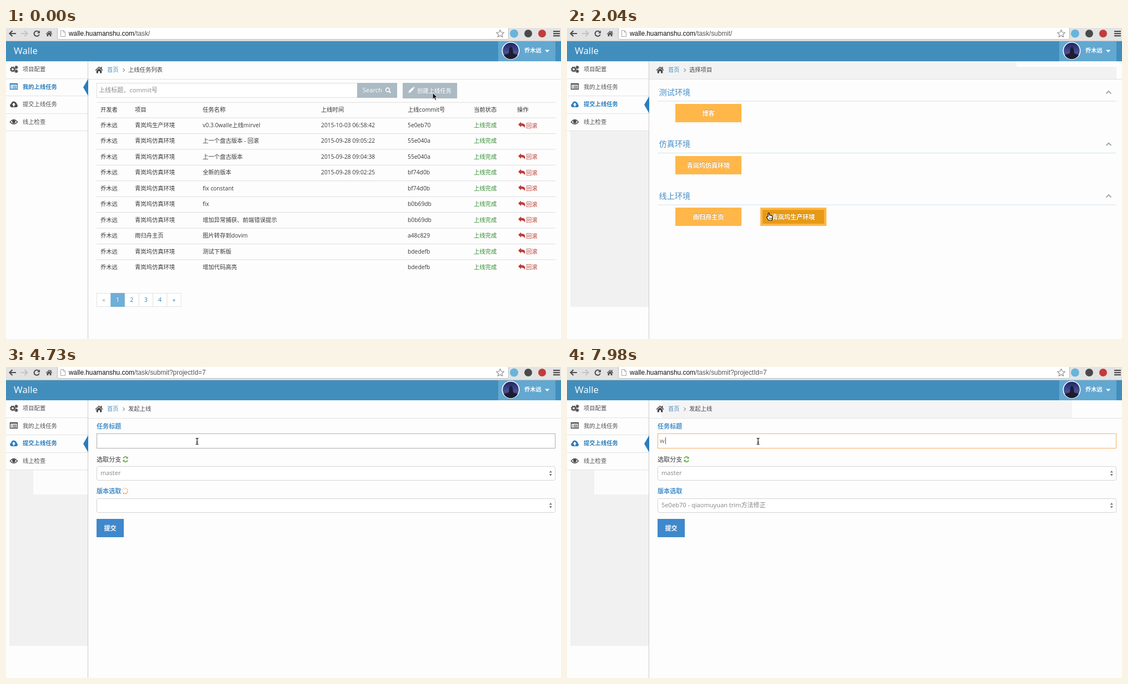
An HTML page for the animation above (8000 ms loop, 999 by 561 pixels).

```html
<!DOCTYPE html>
<html lang="zh">
<head>
<meta charset="utf-8">
<title>Walle</title>
<style>
html, body { margin: 0; width: 100%; height: 100%; overflow: hidden; background: #fdfdfd; }
svg { display: block; font-family: "Open Sans", "Noto Sans CJK SC", "Noto Sans CJK", sans-serif; }
.url { font-family: "Liberation Sans", Arial, sans-serif; }
text { white-space: pre; }
</style>
</head>
<body>
<svg id="stage" width="999" height="561" viewBox="0 0 999 561"></svg>
<script>
const USER = '乔木远', SIM = '青岚坞仿真环境', PROD = '青岚坞生产环境', HOME = '雨归舟主页';
const BLUE = '#2b7dbc', LINK = '#478fca', INK = '#393939', DARK = '#4a4a4a';
const BOLD = 'font-weight="600" ', MID = 'text-anchor="middle" ';

const text = (x, y, s, size = 10.3, fill = INK, more = '') =>
  `<text x="${x}" y="${y}" font-size="${size}" fill="${fill}" ${more}>${s}</text>`;
const rect = (x, y, w, h, fill, more = '') =>
  `<rect x="${x}" y="${y}" width="${w}" height="${h}" fill="${fill}" ${more}/>`;
const box = (x, y, w, h, stroke, more = '') =>
  rect(x + .4, y + .4, w - .8, h - .8, '#fff', `stroke="${stroke}" stroke-width=".8" ${more}`);
const circle = (x, y, r, fill, more = '') =>
  `<circle cx="${x}" cy="${y}" r="${r}" fill="${fill}" ${more}/>`;
const shape = (d, fill, more = '') => `<path d="${d}" fill="${fill}" ${more}/>`;
const line = (d, stroke, w = 1) => `<path d="${d}" fill="none" stroke="${stroke}" stroke-width="${w}"/>`;
const group = (id, body) => `<g id="${id}">${body}</g>`;

// Icons
const house = (x, y, s) => shape('M-7 .5L0-6L3-3.2V-5.5H5V-1.4L7 .5L6 1.5L0-4L-6 1.5Z M-4.8 1.5L0-2.8L4.8 1.5V6H1.5V2.5H-1.5V6H-4.8Z',
  DARK, `transform="translate(${x} ${y}) scale(${s})"`);
const gear = (x, y, r) => circle(x, y, r, 'none', `stroke="${DARK}" stroke-width="2"`) +
  circle(x, y, r + 1.3, 'none', `stroke="${DARK}" stroke-width="1.6" stroke-dasharray="${(r + 1.3) * Math.PI / 8}"`);
const listIcon = c => line('M7.5 100.5H20.5V110.5H7.5Z M7 101.5H21', c, 1.3) +
  line('M9.5 104.5H11M12 104.5H19M9.5 106.5H11M12 106.5H19M9.5 108.5H11M12 108.5H19', c, 1);
const cloudIcon = c => shape('M10 143a3.3 3.3 0 0 1-.6-6.4a4.7 4.7 0 0 1 8.6-2a3 3 0 0 1 1.5 3a2.9 2.9 0 0 1-.6 5.4Z', c) +
  shape('M14 134.8l3.3 3.6h-2v3h-2.6v-3h-2Z', '#fff');
const eye = line('M7.5 169.5Q14 161.5 20.5 169.5Q14 177 7.5 169.5Z', DARK, 1.4) + circle(14, 169, 2.9, DARK);
const reply = y => shape(`M922 ${y - 1.5}l5-4.7v2.6c6 0 8.5 2 7 8.5c-1-3-3-4-7-4v2.6Z`, '#b9403a');
const pencil = shape('M724.5 117l.8-3.4l6.4-6.4l2.6 2.6l-6.4 6.4Z M732.5 106.5l1-.8l2.5 2.4l-1 1Z', '#fff');
const arrows = y => shape(`M977.8 ${y - 1.3}h5l-2.5-3.7Z M977.8 ${y + 1.3}h5l-2.5 3.7Z`, '#777');
const refresh = line('M211 165a4 4 0 0 1 7-1.5M219 168a4 4 0 0 1-7 1.5', '#69aa46', 1.7) +
  shape('M219.5 161.5v4h-4Z M210.5 171.5v-4h4Z', '#69aa46');

function chromeBar() {
  return rect(0, 0, 999, 24, '#e3e3e3') + rect(0, 23, 999, 1, '#bcbcbc') +
    rect(92.5, -4, 812, 24.5, '#fff', 'rx="2" stroke="#bdbdbd"') +
    line('M18 10H6.5M11.5 5L6.5 10L11.5 15', '#4d4d4d', 2.2) +
    line('M27 10H38.5M33.5 5L38.5 10L33.5 15', '#c4c4c4', 2.2) +
    group('reload', line('M59 7.2a4.7 4.7 0 1 0 .8 4.3', '#4d4d4d', 2) + shape('M61 4.5v5h-5Z', '#4d4d4d')) +
    group('stop', line('M50.8 5.8L59.8 14.8M59.8 5.8L50.8 14.8', '#4d4d4d', 2.3)) +
    house(77.5, 10, .82) +
    line('M98.5 4.5H103.5L106.5 7.5V15.5H98.5Z M103.5 4.5V7.5H106.5', '#a5a5a5') +
    `<text class="url" x="113" y="14.3" font-size="11.85" fill="#111">walle.huamanshu.com<tspan id="path" fill="#555"></tspan></text>` +
    line('M889.5 3.5l2 4.3l4.7.5l-3.5 3.2l1 4.6l-4.2-2.4l-4.2 2.4l1-4.6l-3.5-3.2l4.7-.5Z', '#8a8a8a', 1.1) +
    circle(914.5, 10, 7.5, '#68b4dc') + circle(940, 10, 7, '#4a4a4a') + circle(965, 10, 7, '#c33b3b') +
    [5, 9, 13].map(y => rect(985, y, 12, 2.2, '#4d4d4d')).join('');
}

function header() {
  return rect(0, 24, 999, 36, '#418ebd') + rect(886, 24, 103, 36, '#62a8d1') +
    text(14, 47, 'Walle', 17, '#fff') +
    circle(908.5, 41, 15.2, 'url(#night)', 'stroke="#fff" stroke-width="1.6"') +
    shape('M896 49l9-3l1-9l3-4l3 5l1 8l8 3a14.5 14.5 0 0 1-25 0Z', '#1d1c30') +
    text(933, 44, USER, 10.3, '#fff', BOLD) + shape('M970 39.5h8.5l-4.25 4.5Z', '#fff');
}

function sidebar() {
  const label = (y, s, on) => text(30, y, s, 10.3, on ? BLUE : '#505050', `font-weight="${on ? 700 : 500}"`);
  const marker = y => shape(`M148 ${y}V${y + 31}L139 ${y + 15.5}Z`, BLUE);
  const second = on => listIcon(on ? BLUE : DARK) + label(109.5, '我的上线任务', on);
  const third = on => cloudIcon(on ? BLUE : DARK) + label(141, '提交上线任务', on);
  return group('sideGray', rect(6, 186, 141, 317, '#f1f1f1')) +
    group('sideClear', rect(49, 186, 98, 44, '#fcfcfc')) +
    rect(147, 60, 1, 501, '#ccc') +
    [91, 122, 154, 185].map(y => rect(0, y, 147, 1, '#e2e2e2')).join('') +
    gear(12, 74.5, 3) + gear(18.5, 71, 1.2) + gear(18.5, 78, 1.2) + label(77.8, '项目配置') +
    eye + label(172.8, '线上检查') +
    group('menuList', second(true) + third(false) + marker(91.5)) +
    group('menuSubmit', second(false) + third(true) + marker(123));
}

function crumbs() {
  return group('barLeft', rect(148, 60, 661, 32, '#f2f2f2')) +
    group('barRight', rect(809, 70, 180, 22, '#f2f2f2')) +
    group('barEdge', rect(148, 60, 15, 32, '#f2f2f2')) +
    group('barLate', rect(170, 60, 739, 32, '#f4f4f4')) +
    rect(148, 92, 851, 1, '#e2e2e2') + house(167.5, 75.5, 1) +
    text(182, 79.3, '首页', 10.3, '#4c8fbd') + line('M210.5 73l3 3l-3 3', '#999', 1.2) +
    text(220, 79.3, '', 10.3, '#444', 'id="crumb"');
}

function listPage() {
  const cols = [170, 232, 354, 567, 723, 842, 920];
  const rows = [
    [PROD, 'v0.3.0walle上线mirvel', '2015-10-03 06:58:42', '5e0eb70'],
    [SIM, '上一个盘古版本 - 回滚', '2015-09-28 09:05:22', '55e040a'],
    [SIM, '上一个盘古版本', '2015-09-28 09:04:38', '55e040a'],
    [SIM, '全新的版本', '2015-09-28 09:02:25', 'bf74d0b'],
    [SIM, 'fix constant', '', 'bf74d0b'],
    [SIM, 'fix', '', 'b0b69db'],
    [SIM, '增加异常捕获、前端错误提示', '', 'b0b69db'],
    [HOME, '图片转存到dovim', '', 'a48c829'],
    [SIM, '测试下新版', '', 'bdedefb'],
    [SIM, '增加代码高亮', '', 'bdedefb']];
  let s = box(163, 99, 470, 27, '#d5d5d5') + text(167, 116, '上线标题、commit号', 11.1, '#8a8a8a') +
    rect(632, 99, 72, 27, '#abbac3') + text(642, 115.8, 'Search', 11.1, '#fff') +
    circle(687, 111.5, 3.4, 'none', 'stroke="#fff" stroke-width="1.6"') + line('M689.5 114l3 3', '#fff', 2) +
    rect(714, 99, 98, 28, '#abbac3') + group('createHover', rect(717, 102, 92, 22, '#8b9aa3')) +
    pencil + text(740, 116.5, '创建上线任务', 10.3, '#fff') + rect(163, 133.8, 826, .8, '#d5d5d5');
  ['开发者', '项目', '任务名称', '上线时间', '上线commit号', '当前状态', '操作'].forEach((h, i) =>
    s += text(cols[i], 151, h, 10.3, '#333', 'font-weight="500"'));
  rows.forEach((row, i) => {
    const y = 179 + i * 28.44;
    s += rect(163, y - 17.4, 826, .8, '#d5d5d5');
    [USER, ...row].forEach((cell, j) => s += text(cols[j], y, cell));
    s += text(842, y, '上线完成', 10.3, '#2f8a2f');
    if (i != 1) s += reply(y - 3.5) + text(936, y + .5, '回滚', 10.3, '#b9403a');
  });
  ['«', 1, 2, 3, 4, '»'].forEach((p, i) => {
    const x = 163 + i * 25.3, on = i == 1;
    s += (on ? rect(x, 478, 26, 25, '#6faed9') : box(x, 478, 26, 25, '#ddd')) +
      text(x + 12.8, 493.5, p, 10.6, on ? '#fff' : i ? '#2283c5' : '#999', MID);
  });
  return s;
}

function pickPage() {
  const button = (x, y, s, hover = '') => rect(x, y, 119, 33, '#ffb74a') + hover +
    text(x + 59.5, y + 20.8, s, 11.1, '#fff', MID + BOLD + 'style="text-shadow:0 -1px 0 #0003"');
  const section = (y, s) => text(165.5, y + 5, s, 14.2, LINK) + rect(163, y + 16, 826, 1, '#d3e2ec') +
    line(`M970.5 ${y + 3}l4.5-4.5l4.5 4.5`, '#aaa', 2.2);
  return section(115.5, '测试环境') + button(195, 137, '博客') +
    section(209, '仿真环境') + button(195, 231, SIM) +
    section(302.5, '线上环境') + button(195, 324, HOME) +
    button(348, 324, PROD, group('pickHover', rect(352, 328, 111, 25, '#e79a14')));
}

function formPage() {
  let dots = '';
  for (let i = 0; i < 8; i++) {
    const a = i * Math.PI / 4;
    dots += circle(5 * Math.cos(a), 5 * Math.sin(a), .6 + i * .1, '#ff892a');
  }
  const select = y => box(163, y, 826, 25.8, '#c8c8c8', 'rx="3"') + arrows(y + 12.8);
  return text(163, 111, '任务标题', 11.1, LINK, BOLD) + box(163, 119.8, 826, 27, '#d0d0d0', 'id="field"') +
    text(167, 137, 'w', 11.1, '#696969', 'id="typed"') + rect(168, 127, 1, 12, '#555', 'id="caret"') +
    text(163, 170.5, '选取分支', 11.1) + refresh + select(179) + text(170, 195, 'master', 11.1, '#858585') +
    text(163, 228.3, '版本选取', 11.1, LINK, BOLD) + group('spinner', dots) + select(237) +
    text(170, 253.3, '5e0eb70 - qiaomuyuan trim方法修正', 11.1, '#858585', 'id="version"') +
    rect(163, 274, 49, 33, '#3f88cb') + text(187.5, 295, '提交', 11.1, '#fff', MID + BOLD);
}

function cursors() {
  return group('arrow', shape('M0 0V11.5L2.7 9L4.7 13.3L6.7 12.4L4.8 8.3H8.3Z', '#111', 'stroke="#fff" stroke-width=".8"')) +
    group('hand', shape('M-2.5 0V-5.5a1.2 1.2 0 0 1 2.3 0V-2.5l4 .8q1.6.4 1.6 2V3l-1 4H-1.5L-4.8 2.2q-.8-1.5.6-1.8Z', '#fff', 'stroke="#111" stroke-width="1.2"') +
      line('M0 2v3M2 2v3M3.9 2v3', '#111', .7)) +
    group('beam', line('M-2.5-5.5Q0-5.5 0-4V4Q0 5.5-2.5 5.5M2.5-5.5Q0-5.5 0-4M0 4Q0 5.5 2.5 5.5M-1.5 1.5H1.5', '#111', 1.2));
}

const el = id => document.getElementById(id);
el('stage').innerHTML = '<defs><linearGradient id="night" x2="0" y2="1"><stop stop-color="#1c2363"/><stop offset=".6" stop-color="#4a5297"/><stop offset="1" stop-color="#1b1b30"/></linearGradient></defs>' +
  rect(0, 0, 999, 561, '#fdfdfd') + crumbs() + sidebar() + header() + chromeBar() +
  group('list', listPage()) + group('pick', pickPage()) + group('form', formPage()) + cursors();

const STEP = 147.2;
const show = (id, on) => el(id).style.display = on ? '' : 'none';
const stepsSince = (t, start, max) => Math.max(0, Math.min(max, Math.floor((t - start) / STEP) + 1));
const ease = p => p * p * (3 - 2 * p);
const mix = (a, b, p) => a + (b - a) * p;

function draw(t) {
  // The address changes before the second page is painted.
  const page = t < 980 ? 'list' : t < 2940 ? 'pick' : 'form';
  for (const id of ['list', 'pick', 'form']) show(id, id == page);
  el('path').textContent = t < 830 ? '/task/' : t < 2940 ? '/task/submit/' : '/task/submit?projectId=7';
  el('crumb').textContent = { list: '上线任务列表', pick: '选择项目', form: '发起上线' }[page];

  const loading = t >= 390 && t < 1120 || t >= 2490 && t < 3530;
  show('stop', loading);
  show('reload', !loading);
  show('menuList', page == 'list');
  show('menuSubmit', page != 'list');
  show('sideGray', page != 'list');
  show('sideClear', t >= 3530);
  show('barLeft', t >= 390 && t < 2940);
  show('barRight', page == 'pick');
  show('barEdge', page == 'form' && t < 3530);
  show('barLate', t >= 7380);

  // Two cursor moves; the second runs a little too far and settles back.
  const first = stepsSince(t, 1598, 4), second = stepsSince(t, 3987, 5);
  const overField = second >= 4;
  show('createHover', t >= 150);
  show('pickHover', first == 4);

  const ready = t >= 7380, focus = t >= 7530, typed = t >= 7980;
  el('field').setAttribute('stroke', focus ? '#f59942' : overField ? '#999' : '#d0d0d0');
  show('typed', typed);
  show('caret', focus);
  el('caret').setAttribute('x', typed ? 177 : 168);
  show('version', ready);
  show('spinner', !ready);
  const turn = Math.floor((t - 3836) / STEP) * STEP * .18;
  el('spinner').setAttribute('transform', `translate(214 223.5) rotate(${turn})`);

  const moving = first % 4 || second && !overField;
  const kind = t < 150 || moving ? 'arrow' : overField ? 'beam' : 'hand';
  const p = ease(first / 4), q = ease(Math.min(1, second / 4));
  const x = mix(mix(769, 364.5, p), 344, q);
  const y = mix(mix(124, 340, p), second == 5 ? 134 : 121, q);
  for (const id of ['arrow', 'hand', 'beam']) show(id, id == kind);
  el(kind).setAttribute('transform', kind == 'arrow' ? `translate(${x - 1} ${y - 7})` : `translate(${x} ${y})`);
}

const begin = performance.now();
(function loop() {
  draw((performance.now() - begin) % 8000);
  requestAnimationFrame(loop);
})();
</script>
</body>
</html>
```
